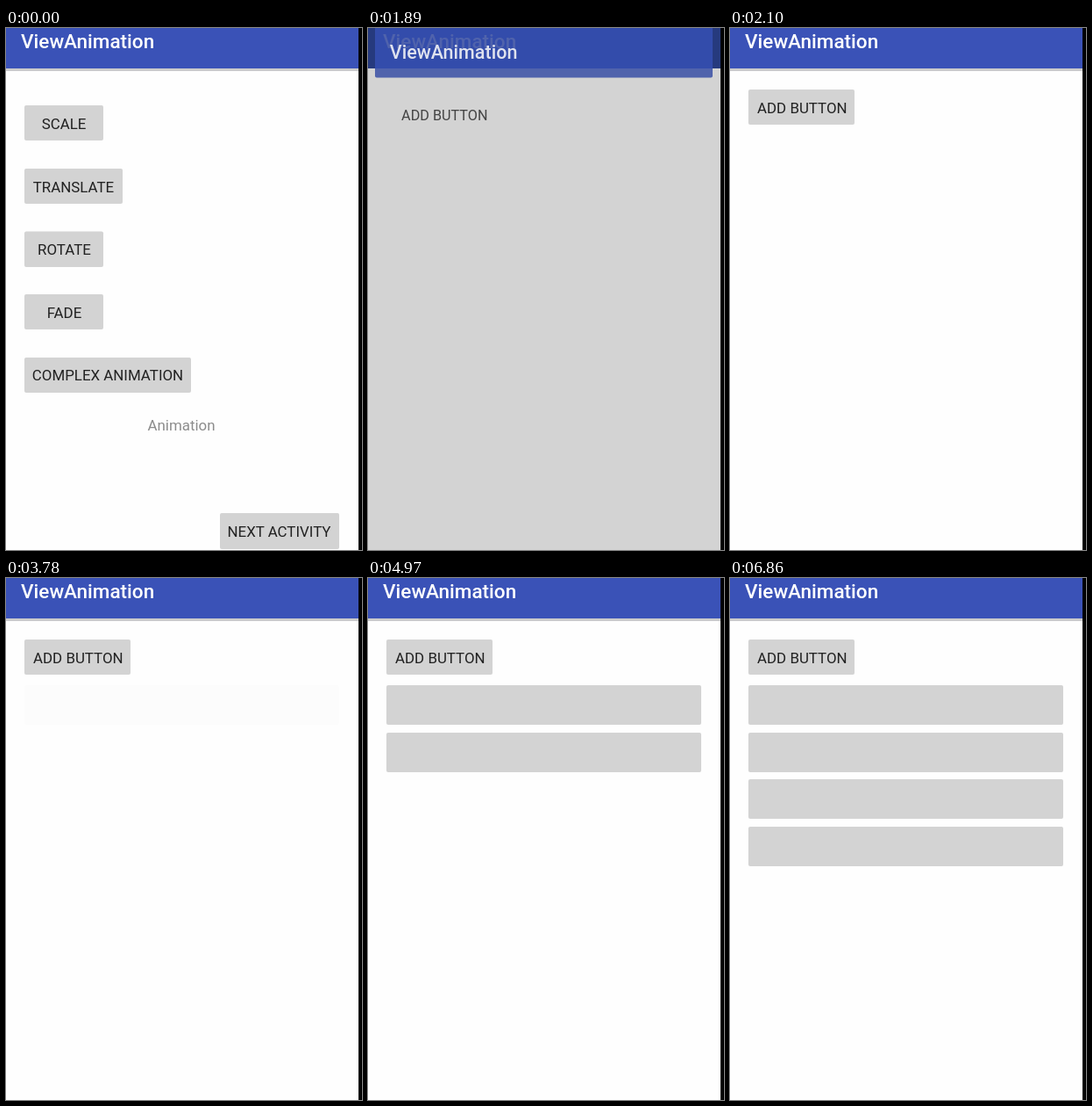
An HTML page for the animation above (7.42 s loop, 406 by 594 pixels).

```html
<!DOCTYPE html>
<html lang="en">
<head>
<meta charset="utf-8">
<title>ViewAnimation</title>
<style>
  html, body { margin: 0; width: 100%; height: 100%; overflow: hidden; background: #fefefe; }
  svg { display: block; width: 406px; height: 594px; }
  text { font: 16.9px Roboto, sans-serif; fill: #222; }
  .mid { text-anchor: middle; }
  .title { font-size: 22.5px; font-weight: 500; fill: #fff; }
  .btn rect, .bars rect, .grey { fill: #d3d3d3; }
  .head { fill: #3a52b7; }
  .shade { fill: #cbcbcb; }

  .zoom { transform-origin: 201px 297px; }
  .small { transform: scale(.888); }
  .large { transform: scale(.958); }

  #menu, #enter1, #enter2, #edge, #list, #page, .bars rect {
    animation: 7420ms step-end infinite;
  }
  #menu { animation-name: menu; }
  #enter1 { animation-name: enter1; }
  #enter2 { animation-name: enter2; }
  #edge { animation-name: edge; }
  #list { animation-name: list; }
  #page { animation-name: settle; }

  @keyframes menu { 0% { visibility: visible } 24.52%, 100% { visibility: hidden } }
  @keyframes enter1 { 0%, 25.46%, 100% { visibility: hidden } 24.52% { visibility: visible } }
  @keyframes enter2 { 0%, 26.41%, 100% { visibility: hidden } 25.46% { visibility: visible } }
  @keyframes edge { 0%, 27.35%, 100% { visibility: hidden } 26.41% { visibility: visible } }
  @keyframes list { 0% { visibility: hidden } 26.41%, 100% { visibility: visible } }
  @keyframes settle {
    0% { transform: scale(.991) }
    27.35% { transform: scale(.998) }
    28.29%, 100% { transform: none }
  }

  .bars :nth-child(1) { animation-name: fade1; }
  .bars :nth-child(2) { animation-name: fade2; }
  .bars :nth-child(3) { animation-name: fade3; }
  .bars :nth-child(4) { animation-name: fade4; }
  @keyframes fade1 {
    0% { opacity: 0 } 50.94% { opacity: .03 } 51.88% { opacity: .3 }
    52.82% { opacity: .7 } 53.77%, 100% { opacity: 1 }
  }
  @keyframes fade2 {
    0% { opacity: 0 } 64.15% { opacity: .03 } 65.09% { opacity: .3 }
    66.03% { opacity: .7 } 66.98%, 100% { opacity: 1 }
  }
  @keyframes fade3 {
    0% { opacity: 0 } 78.3% { opacity: .2 } 79.24% { opacity: .65 }
    80.18%, 100% { opacity: 1 }
  }
  @keyframes fade4 {
    0% { opacity: 0 } 91.5% { opacity: .5 } 92.45%, 100% { opacity: 1 }
  }
</style>
</head>
<body>
<svg viewBox="0 0 406 594">
  <defs>
    <g id="boxes" class="btn">
      <rect x="21" y="88" width="90" height="40" rx="2"/>
      <rect x="21" y="160" width="112" height="40" rx="2"/>
      <rect x="21" y="231.5" width="90" height="40.5" rx="2"/>
      <rect x="21" y="303" width="90" height="40" rx="2"/>
      <rect x="21" y="375" width="190" height="40" rx="2"/>
      <rect x="244" y="552" width="136" height="41" rx="2"/>
    </g>
    <g id="bar">
      <rect class="shade" y="46" width="402" height="3"/>
      <rect class="head" width="402" height="46"/>
      <text class="title" x="17" y="23">ViewAnimation</text>
    </g>
  </defs>

  <rect width="406" height="594" fill="#fefefe"/>

  <g id="menu">
    <use href="#bar"/>
    <use href="#boxes"/>
    <g class="mid">
      <text x="66" y="115">SCALE</text>
      <text x="77" y="186.5">TRANSLATE</text>
      <text x="66.5" y="258">ROTATE</text>
      <text x="66.5" y="329.5">FADE</text>
      <text x="116" y="401">COMPLEX ANIMATION</text>
      <text x="311.5" y="579">NEXT ACTIVITY</text>
      <text x="200" y="458" style="fill:#8c8c8c">Animation</text>
    </g>
  </g>

  <g id="enter1">
    <rect width="402" height="46" fill="#334aa8"/>
    <rect x="22" y="18" width="357" height="28" rx="2" fill="#354eb3"/>
    <rect class="grey" y="46" width="402" height="11"/>
    <rect class="grey" x="22" y="57" width="357" height="19"/>
    <text class="title" x="17" y="23" style="fill:#eef0f8">ViewAnimation</text>
    <g class="zoom small">
      <text class="title" x="17" y="23" style="fill:#c9cfe6">ViewAnimation</text>
      <rect class="grey" x="21" y="70" width="121" height="40" rx="2"/>
    </g>
    <use href="#boxes"/>
    <text class="mid" x="66" y="115" style="fill:#555">SCALE</text>
    <text class="mid" x="200" y="458" style="fill:#cbcbcb">Animation</text>
  </g>

  <g id="enter2">
    <rect class="grey" width="402" height="594"/>
    <rect width="402" height="46" fill="#263a7e"/>
    <rect x="8" y="-4" width="385" height="60.5" rx="2" fill="#5063ac"/>
    <rect x="8" width="385" height="46" fill="#334cab"/>
    <text class="title" x="17" y="23" style="fill:#5063ac">ViewAnimation</text>
    <g class="zoom large">
      <text class="title" x="17" y="23" style="fill:#dfe2ee">ViewAnimation</text>
      <text class="mid" x="82.3" y="97" style="fill:#444">ADD BUTTON</text>
    </g>
  </g>

  <g id="list">
    <g id="page" class="zoom">
      <use href="#bar"/>
      <rect class="head" y="-6" width="402" height="7"/>
      <g class="btn">
        <rect x="21" y="70" width="121" height="40" rx="2"/>
        <text class="mid" x="82.3" y="97">ADD BUTTON</text>
      </g>
      <g class="bars">
        <rect x="21" y="122" width="359" height="45" rx="2"/>
        <rect x="21" y="176" width="359" height="45" rx="2"/>
        <rect x="21" y="229" width="359" height="45" rx="2"/>
        <rect x="21" y="283" width="359" height="45" rx="2"/>
      </g>
    </g>
  </g>

  <g id="edge">
    <rect class="shade" x="1" y="49" width="400" height="6"/>
    <path d="M1 0h1v48.5h-1zM400 0h1v48.5h-1z" fill="#3a52b7"/>
    <path d="M0 0h1v594h-1zM401 0h1v594h-1z" fill="#4a4a4a"/>
  </g>

  <rect x="402" width="4" height="594" fill="#000"/>
</svg>
</body>
</html>
```
